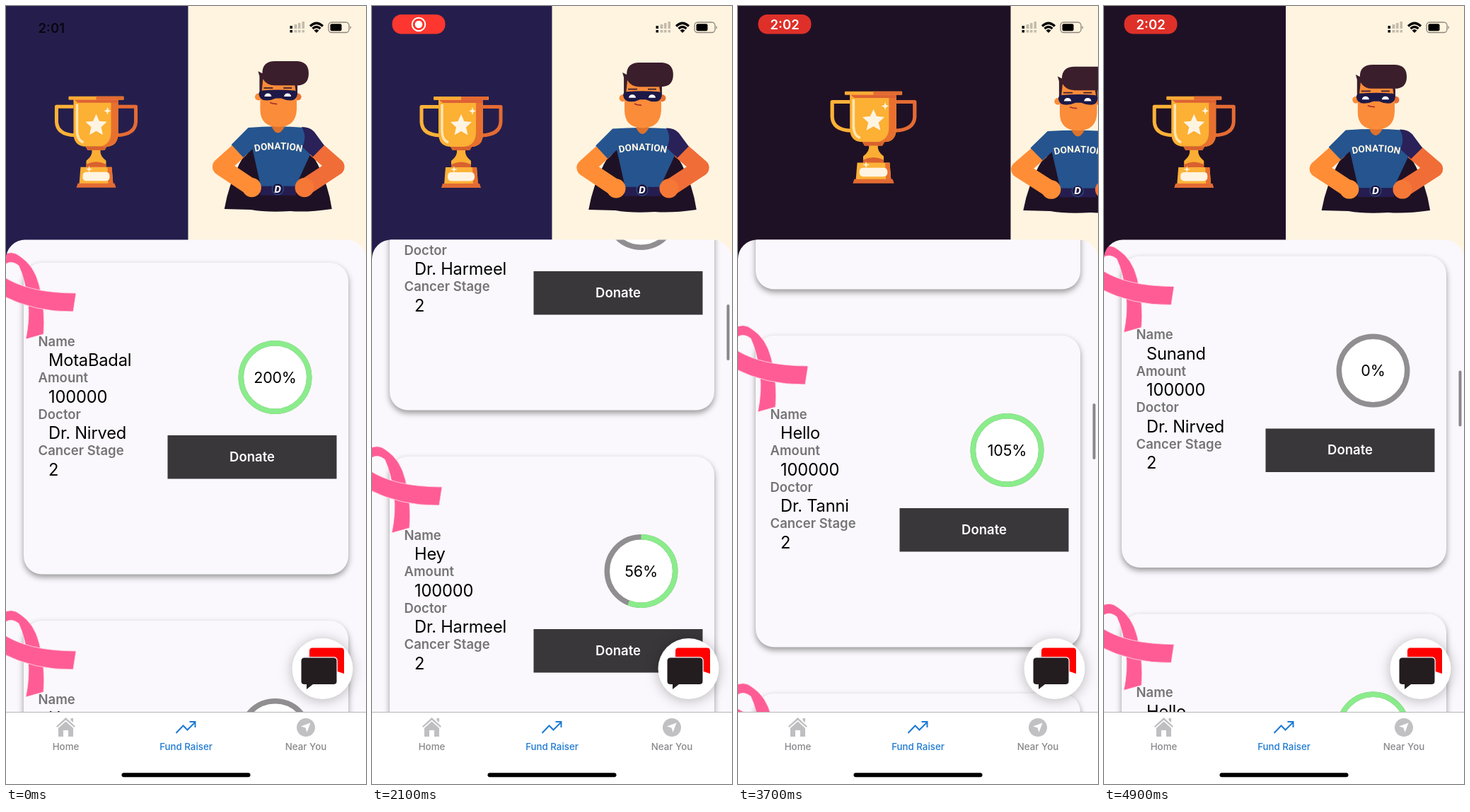
An HTML page for the animation above (5 s loop, 509 px wide and 1100 px high).

```html
<!DOCTYPE html>
<html lang="en">
<head>
<meta charset="utf-8">
<title>Fund Raiser</title>
<style>
html, body { margin: 0; height: 100%; overflow: hidden; background: #fff; }
svg { display: block; width: 509px; height: 1100px; }
text { font-family: Inter, "Liberation Sans", sans-serif; }
.card { fill: #faf8fc; filter: drop-shadow(0 4px 4px #0006); }
.label { font-size: 18.5px; font-weight: 600; fill: #757476; }
.value { font-size: 23.7px; letter-spacing: -.2px; }
.mid { text-anchor: middle; }
.tab { font-size: 13.3px; font-weight: 500; text-anchor: middle; fill: #88888b; }
.time { font-size: 18.5px; font-weight: 600; }
.fab { filter: drop-shadow(0 2px 9px #0004); }
</style>
</head>
<body>
<svg viewBox="0 0 509 1100">
  <defs>
    <clipPath id="sheetClip"><rect y="330.500" width="509" height="720" rx="27"/></clipPath>
    <clipPath id="creamClip"><rect id="creamEdge" width="509" height="360"/></clipPath>
    <path id="chest" d="M347 209.500Q382 201 419 210"/>
    <g id="ribbon" fill="#ff5c95" stroke="#ffe3ee" stroke-width=".8">
      <path d="M-6-10Q8-19 20-9Q40 4 47 32Q56 68 53 101L28 108Q34 78 31 55Q27 23 18 4Q8-4-1 2L-6 8Z"/>
      <path d="M-6 18Q30 43 99 43L95 69Q40 70-6 46Z"/>
    </g>
  </defs>

  <rect id="wall" width="509" height="360"/>
  <g id="trophy">
    <g fill="none" stroke-width="5" stroke-linejoin="round">
      <path d="M94 142.500H70V164Q71 182 96 183" stroke="#fdb238"/>
      <path d="M157 142.500H182V164Q181 182 155 183" stroke="#e56b34"/>
    </g>
    <path d="M94 131H157V180Q157 199 140 199H112Q94 199 94 180Z" fill="#fcb034"/>
    <path d="M147 131H157V180Q157 199 140 199H130Q147 197 147 178Z" fill="#e8702f"/>
    <path d="M94 132H157V137H100Z" fill="#de6134"/>
    <rect x="87" y="128" width="78" height="5" rx="1" fill="#fbaa36"/>
    <path d="M126 128H164L165 133H126Z" fill="#e36b33"/>
    <path d="M99 139V176Q99 190 108 193" fill="none" stroke="#ffe5b0" stroke-width="3.500"/>
    <path d="M126 153L130.400 163 141 164 133 171.500 135.500 182.500 126 177 116.500 182.500 119 171.500 111 164 121.600 163Z" fill="#fff4e2"/>
    <path d="M111 199H141L138 204H132Q131 212 140 219V229H112V219Q121 212 120 204H114Z" fill="#fbae34"/>
    <path d="M111 199H141L138 204H114ZM112 224Q126 217 140 224V229H112Z" fill="#d9612e"/>
    <path d="M104 228H148L150 253H102Z" fill="#fdb238"/>
    <path d="M142 228H148L150 253H143Z" fill="#e8702f"/>
    <rect x="107" y="235" width="38" height="12.500" rx="5" fill="#fff4e2"/>
    <path d="M100 251H152L154 257H98Z" fill="#e26b33"/>
    <path d="M142 143L143.300 147 147 148.500 143.300 150 142 154 140.700 150 137 148.500 140.700 147ZM116 226L117 230 121 231 117 232 116 236 115 232 111 231 115 230Z" fill="#fff4e2"/>
  </g>

  <g clip-path="url(#creamClip)">
    <rect width="509" height="360" fill="#fff4e0"/>
    <g id="hero">
      <path d="M346 196H420Q452 240 459 289Q424 294 400 292Q366 294 344 290L306 289Q315 238 346 196Z" fill="#1f1125"/>
      <g fill="none" stroke-width="24" stroke-linecap="round" stroke-linejoin="round">
        <path d="M329 205L301 230 345 259" stroke="#ff8d36"/>
        <path d="M436 205L465 230 420 259" stroke="#f06d37"/>
      </g>
      <path d="M340 175Q382 172 420 175L436 196 407 258H358L346 205 333 217 316 199Z" fill="#25548f"/>
      <path d="M416 174Q428 174 434 181L448 200 432 216 417 202Q424 187 416 174Z" fill="#292158"/>
      <rect x="357" y="257" width="51" height="13" fill="#251d50"/>
      <circle cx="345" cy="259" r="13.500" fill="#ff8d36"/>
      <circle cx="420" cy="259" r="13.500" fill="#f57836"/>
      <circle cx="382" cy="261" r="8" fill="#1c1743" stroke="#335894"/>
      <text class="mid" x="382" y="266" font-size="13" font-weight="800" font-style="italic" fill="#fff">D</text>
      <path d="M374 162H391V175Q382 190 374 175Z" fill="#dc722c"/>
      <circle cx="354.500" cy="132" r="5" fill="#fb8c39"/>
      <circle cx="410.500" cy="132" r="5" fill="#e8702f"/>
      <path d="M357 105H409V149Q408 174 383 174Q357 174 357 149Z" fill="#fb8c39"/>
      <path d="M356 126V103L354 96 360 99Q360 82 378 82H410Q426 83 426 99Q426 116 409 116H378Q366 116 361 107L359 126Z" fill="#3b1e2c"/>
      <path d="M406 114L410 116V127H408Z" fill="#3b1e2c"/>
      <path d="M359 123Q383 121 406 123Q410 124 410 128Q409 137 400 137Q393 137 387 134H379Q373 137 366 137Q356 137 355 128Q355 124 359 123Z" fill="#1d1947"/>
      <path d="M363 131.500A5 4.500 0 0 1 373 131.500ZM391 131.500A5 4.500 0 0 1 401 131.500Z" fill="#fff"/>
      <path d="M362 119.500H375M390 119.500H402" stroke="#3b1e2c" stroke-width="1.800"/>
      <path d="M371 140Q375 142 381 142" fill="none" stroke="#a22c2c" stroke-width="1.800"/>
      <text class="mid" font-size="13.500" font-weight="700" fill="#fff6e5" style="font-family:Roboto,sans-serif"><textPath href="#chest" startOffset="50%">DONATION</textPath></text>
    </g>
  </g>
  <g id="riser">
    <rect width="509" height="400" fill="#1f1125"/>
    <path d="M363 0Q382-4 400 0Z" fill="#fff4e0"/>
  </g>

  <rect id="pill" x="28.500" y="12" width="75" height="27.500" rx="13"/>
  <g id="rec" fill="#fff">
    <circle cx="66" cy="26" r="9.300" fill="none" stroke="#fff" stroke-width="2"/>
    <circle cx="66" cy="26" r="5.300"/>
  </g>
  <text id="clock" class="time" x="45.500"></text>
  <g id="status">
    <path d="M401.500 28H405V32H401.500ZM401.500 34H405V37.500H401.500Z"/>
    <path d="M407.500 26H411.500V32H407.500ZM413 24H416.500V32H413ZM418.500 22H422V32H418.500ZM407.500 34H411.500V37.500H407.500ZM413 34H416.500V37.500H413ZM418.500 34H422V37.500H418.500Z" opacity=".23"/>
    <path d="M430 28.500Q439 20 448 28.500M433.500 32Q439 27 444.500 32" fill="none" stroke="#000" stroke-width="3.200"/>
    <path d="M435.500 34.500Q439 31.500 442.500 34.500L439 38Z"/>
    <rect x="456" y="23" width="29" height="14.500" rx="4.500" fill="none" stroke="#000" stroke-width="1.300" opacity=".45"/>
    <path d="M486.500 28Q489.500 30 486.500 33Z" opacity=".45"/>
    <rect x="458.500" y="25.300" width="16" height="10" rx="2"/>
  </g>

  <g clip-path="url(#sheetClip)">
    <rect y="330" width="509" height="720" fill="#faf8fc"/>
    <g id="list"></g>
    <rect id="bar" x="501.500" width="4" height="79" rx="2" fill="#89878b"/>
  </g>

  <circle class="fab" cx="447.500" cy="937" r="43" fill="#fff"/>
  <path d="M433 907.500H474Q478 907.500 478 912V944L469 941H433Q429 941 429 937V912Q429 907.500 433 907.500Z" fill="#f00"/>
  <path d="M422 921.500H463Q467.500 921.500 467.500 926V955Q467.500 959 463 959H434L425 966V959H422Q417.500 959 417.500 955V926Q417.500 921.500 422 921.500Z" fill="#231d20" stroke="#fff" stroke-width="2.500" paint-order="stroke"/>

  <rect y="998" width="509" height="102" fill="#fff"/>
  <path d="M0 998.500H509" stroke="#b5b4b7"/>
  <path d="M84.500 1006L98 1018.500 96.500 1020 84.500 1009.500 72.500 1020 71 1018.500ZM91.500 1007H95V1013L91.500 1010ZM84.500 1011.500L95 1021V1033H88V1024H81V1033H74V1021Z" fill="#bfbec1"/>
  <path d="M240.500 1028L250.500 1017.500 256.500 1023.500 267 1013M259.500 1012H267.500V1020" fill="none" stroke="#1f7ad2" stroke-width="2"/>
  <circle cx="424" cy="1020" r="13" fill="#c1c0c3"/>
  <path d="M430.500 1013.500L425.500 1027 423.500 1020.500 417 1018.500Z" fill="#fff"/>
  <text class="tab" x="84.500" y="1052">Home</text>
  <text class="tab" x="254.500" y="1052" style="fill:#1f7ad2">Fund Raiser</text>
  <text class="tab" x="424" y="1052">Near You</text>
  <rect x="163.500" y="1084.300" width="182" height="6" rx="3"/>
</svg>
<script>
const $ = id => document.getElementById(id);
const LOOP = 5000, PITCH = 506, RING = 48.2;

const people = [
  ["MotaBadal", "Nirved", 200],
  ["Hey", "Harmeel", 0],
  ["Hey", "Harmeel", 56],
  ["Sunand", "Nirved", 0],
  ["Hello", "Tanni", 105],
  ["Hello", "Tanni", 0]
];

function card([name, doctor, percent], i) {
  const fields = [["Name", name], ["Amount", "100000"], ["Doctor", "Dr. " + doctor], ["Cancer Stage", "2"]];
  const rows = fields.map(([label, value], k) => `
    <text class="label" x="45.5" y="${117.5 + k * 51.6}">${label}</text>
    <text class="value" x="60" y="${146 + k * 51.6}">${value}</text>`).join("");
  return `<g transform="translate(0 ${363 + i * PITCH})">
    <rect class="card" x="25" width="459" height="440.5" rx="26"/>
    <use href="#ribbon"/>${rows}
    <circle cx="380.500" cy="162" r="${RING}" fill="#fff" stroke="#908e91" stroke-width="7.5"/>
    <circle cx="380.500" cy="162" r="${RING}" fill="none" stroke="#8aec8b" stroke-width="7.5"
      pathLength="100" stroke-dasharray="${Math.min(percent, 100)} 100"
      transform="rotate(-90 380.5 162)" ${percent ? "" : 'display="none"'}/>
    <text class="mid" x="380.500" y="169.500" font-size="21.5" letter-spacing="-.2">${percent}%</text>
    <rect x="228.500" y="244" width="239" height="61.500" fill="#39373a"/>
    <text class="mid" x="348" y="280.500" font-size="18.500" font-weight="600" fill="#fff">Donate</text>
  </g>`;
}
$("list").innerHTML = people.map(card).join("");

const linear = u => u;
const smooth = u => u * u * (3 - 2 * u);

// Interpolates between [time, value] pairs.
function track(keys, t, ease = linear) {
  const i = keys.findIndex(k => k[0] > t);
  if (i === 0) return keys[0][1];
  if (i < 0) return keys.at(-1)[1];
  const [t0, a] = keys[i - 1], [t1, b] = keys[i];
  return a + (b - a) * ease((t - t0) / (t1 - t0));
}

const scrollKeys = [[1500, 0], [2100, 738], [2600, 1510], [3200, 1844], [3700, 1921], [4200, 1921], [4800, 1527.5]];
const splitKeys = [[0, 257.5], [1000, 254.5], [2700, 254.5], [2800, 509], [3400, 509], [4000, 262], [4200, 249], [4600, 257]];
const squashKeys = [[0, -2], [1400, 0], [2100, -1], [2600, 1], [3900, 4], [4200, 13], [4600, 1], [4900, 1], [5000, -2]];
const riseKeys = [[2400, 345], [2500, 330], [2600, 288], [2700, 120], [2800, 0]];
const popKeys = [[2800, 220], [3100, 0]];

function drawHeader(t) {
  const split = track(splitKeys, t, smooth);
  const shift = split - 254.5, spread = shift / 254.5;
  const covered = t >= 2800;
  const squash = track(squashKeys, t, smooth);
  const pop = covered ? track(popKeys, t, smooth) : 0;

  $("wall").setAttribute("fill", covered ? "#1f1125" : "#251e4c");
  $("creamEdge").setAttribute("x", split);
  $("trophy").setAttribute("transform",
    `translate(${126 + shift / 2} ${192.5 - 13 * spread + pop}) scale(${1 + .08 * spread} ${1 + .015 * spread}) translate(-126 -192.5)`);
  $("hero").setAttribute("transform",
    `translate(${382 + shift * .75} ${292 + Math.min(squash, 0)}) scale(${1 + squash * .0033} ${1 - squash / 210}) translate(-382 -292)`);
  $("riser").setAttribute("transform", `translate(0 ${track(riseKeys, t)})`);
  $("riser").style.display = covered || t < 2500 ? "none" : "";
}

function drawClock(t) {
  const shown = track([[0, 0], [300, 1]], t);
  const clock = track([[3100, 0], [3200, .55], [3300, 1]], t);
  const glow = .5 - .5 * Math.cos((t - 1400) / 1200 * 2 * Math.PI);
  const mix = (a, b) => Math.round(a + (b - a) * glow);
  $("pill").setAttribute("fill", `rgb(${mix(220, 255)},${mix(47, 56)},${mix(40, 48)})`);
  $("pill").style.opacity = shown;
  $("rec").style.opacity = shown * (1 - clock);
  const early = t < 300;
  $("clock").textContent = t < 3600 ? "2:01" : "2:02";
  $("clock").setAttribute("y", early ? 37.5 : 32.8);
  $("clock").setAttribute("fill", early ? "#080612" : "#fff");
  $("clock").style.opacity = early ? 1 - shown : clock;
}

function drawList(t) {
  const scroll = track(scrollKeys, t);
  $("list").setAttribute("transform", `translate(0 ${-scroll})`);
  $("bar").setAttribute("y", 334.7 + scroll / 8.45);
  $("bar").style.opacity = t >= 1600 ? 1 : 0;
}

function frame(now) {
  const t = Math.floor(now % LOOP / 100) * 100;
  drawHeader(t);
  drawClock(t);
  drawList(t);
  requestAnimationFrame(frame);
}
frame(performance.now());
</script>
</body>
</html>
```
